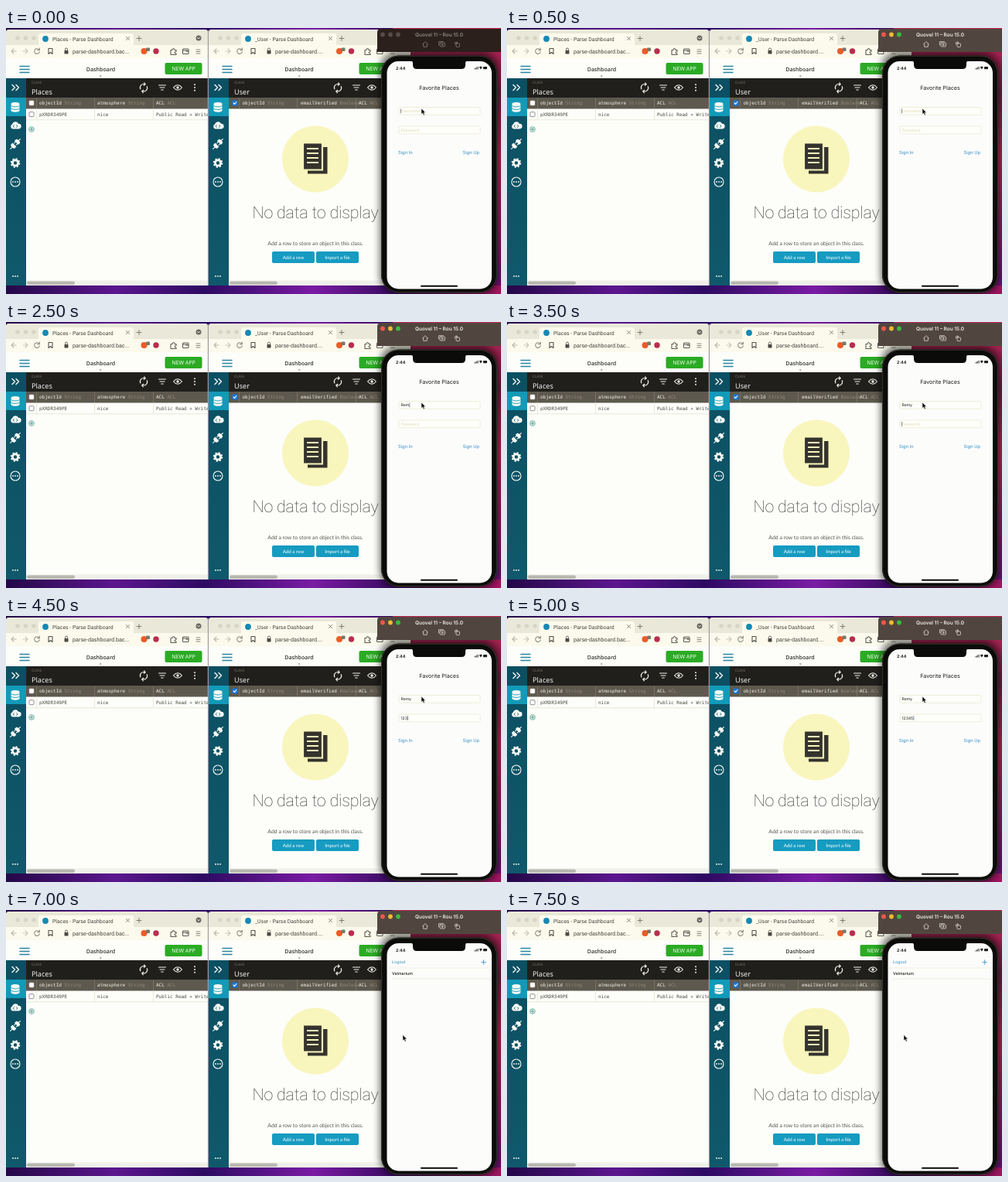
An HTML page that plays this animation: 640x344 px, repeating every 8000 ms.

```html
<!DOCTYPE html>
<html lang="en">
<head>
<meta charset="utf-8">
<title>Dashboard and phone sign-in</title>
<style>
html, body { margin: 0; width: 100%; height: 100%; overflow: hidden; background: #2c0a4c; }
svg { display: block; width: 100%; height: 100%; text-rendering: geometricPrecision; }
text { white-space: pre; }
.ui { font: 6.9px Roboto, sans-serif; fill: #45453f; }
.head { font: 600 7.1px "Open Sans", sans-serif; fill: #30302c; }
.title { font: 9.2px "Open Sans", sans-serif; fill: #fff; }
.mono { font: 6px "DejaVu Sans Mono", monospace; fill: #4a4a42; }
.th { fill: #f3f1e4; }
.dim { fill: #8e8a78; }
.lato { font: 6.9px Lato, sans-serif; fill: #55554e; }
.app { font: 5.1px Inter, sans-serif; fill: #1c1c18; }
.link { font-size: 5.8px; fill: #2e8cc4; }
.line { fill: none; stroke: currentColor; stroke-width: 1.1; stroke-linecap: round; stroke-linejoin: round; }
.mid { text-anchor: middle; }
</style>
</head>
<body>
<svg viewBox="0 0 640 344" preserveAspectRatio="none">
  <defs>
    <linearGradient id="wall">
      <stop offset="0" stop-color="#240848"/>
      <stop offset=".22" stop-color="#5c168e"/>
      <stop offset=".4" stop-color="#2d0a62"/>
      <stop offset=".62" stop-color="#7a1ba4"/>
      <stop offset=".78" stop-color="#3b0b62"/>
      <stop offset="1" stop-color="#a2175f"/>
    </linearGradient>
    <linearGradient id="edge" x2="0" y2="1">
      <stop offset="0" stop-color="#c8285c"/>
      <stop offset=".25" stop-color="#6b1c40"/>
      <stop offset=".5" stop-color="#b02a52"/>
      <stop offset="1" stop-color="#6a1270"/>
    </linearGradient>
    <linearGradient id="side" x2="0" y2="1">
      <stop offset="0" stop-color="#0c4f62"/>
      <stop offset="1" stop-color="#10586b"/>
    </linearGradient>
    <filter id="blur" x="-20%" y="-20%" width="140%" height="140%"><feGaussianBlur stdDeviation="5"/></filter>

    <!-- left-aligned parts of a browser window -->
    <g id="left">
      <g fill="#d6d5c8"><circle cx="15" cy="13" r="2.8"/><circle cx="25.5" cy="13" r="2.8"/><circle cx="36" cy="13" r="2.8"/></g>
      <path d="M42 22V10q0-3 3-3H162q3 0 3 3V22z" fill="#fbfaec"/>
      <circle cx="51" cy="14" r="3.9" fill="#1589b4"/>
      <path d="M155.5 11.5l4 4m0-4l-4 4M169 13.5h6m-3-3v6" class="line" color="#66665c" style="stroke-width:.8"/>
      <g class="line" color="#8a8a80">
        <path d="M13 30H7m3-3l-3 3 3 3" opacity=".6"/>
        <path d="M22 30h6m-3-3l3 3-3 3" opacity=".45"/>
        <path d="M43 28.5a3.3 3.3 0 1 0 .3 2.3M43.3 26v2.7h-2.7"/>
        <path d="M55 26.5h5v7l-2.5-2-2.5 2z" color="#55554e"/>
      </g>
      <rect x="75.5" y="29" width="5" height="4.5" rx=".7" fill="#4b4b44"/>
      <path d="M76.5 29v-1.5a1.5 1.5 0 0 1 3 0V29" class="line" color="#4b4b44" style="stroke-width:.8"/>
      <path d="M18 49.5h12M18 53.5h12M18 57.5h12" class="line" color="#2786a3" style="stroke-width:1.5"/>
      <rect y="65" width="26" height="268" fill="url(#side)"/>
      <rect y="90" width="26" height="24" fill="#129ab8"/>
      <g class="line" color="#f7faf5">
        <path d="M8 73.5l3.5 3.5L8 80.5m5-7l3.5 3.5-3.5 3.5" style="stroke-width:1.4"/>
        <circle cx="12" cy="199" r="6"/>
      </g>
      <g fill="#f7faf5">
        <path d="M6.5 98.5v8c0 3 11 3 11 0v-8z"/><ellipse cx="12" cy="98" rx="5.5" ry="2"/>
        <path d="M6.5 100.5c1 2 10 2 11 0M6.5 104c1 2 10 2 11 0" class="line" color="#129ab8" style="stroke-width:.9"/>
        <path d="M8.5 130.5a3.2 3.2 0 0 1-.5-6 4.3 4.3 0 0 1 8-.8 3.4 3.4 0 0 1 .5 6.8z"/>
        <path d="M10.5 125.5l-1.5 1.5 1.5 1.5m3-3l1.5 1.5-1.5 1.5" class="line" color="#10586b" style="stroke-width:.8"/>
        <g transform="rotate(45 12 150)">
          <path d="M8.5 148v-2.5q0-2 3.5-2t3.5 2v2.5zM8.5 151.5h7v2.5q0 2-3.5 2t-3.5-2z"/>
          <path d="M12 141v3m0 11v4M10.3 147v3m3.4-3v3" class="line" color="#f7faf5"/>
        </g>
        <circle cx="12" cy="174.5" r="3.6" fill="none" stroke="#f7faf5" stroke-width="2.8"/>
        <circle cx="12" cy="174.5" r="5.3" fill="none" stroke="#f7faf5" stroke-width="2" stroke-dasharray="2.08 2.08"/>
        <g id="dots"><circle cx="9" cy="199" r=".9"/><circle cx="12" cy="199" r=".9"/><circle cx="15" cy="199" r=".9"/></g>
        <use href="#dots" y="122"/>
      </g>
    </g>

    <!-- right-aligned parts of a browser window -->
    <g id="right">
      <g class="line" color="#5d5d55">
        <path d="M213 28.5h2q0-2 1.5-2t1.5 2h2v2q-2 0-2 1.2t2 1.3v1.5h-7z"/>
        <rect x="228.5" y="27" width="7.5" height="6.5" rx="1"/><path d="M233 30h3M228.5 29h6"/>
        <path d="M246 28h5m-5 2.5h5m-5 2.5h5" color="#8a8a80"/>
      </g>
      <circle cx="249" cy="13" r="3.5" fill="#6c6c64"/>
      <path d="M247.5 12.5l1.5 1.5 1.5-1.5" class="line" color="#fff" style="stroke-width:.8"/>
      <rect x="205.5" y="45" width="48" height="15" rx="2" fill="#2bab24"/>
      <text x="229.5" y="55" class="head mid" style="fill:#fff;font-weight:400">NEW APP</text>
      <g class="line" color="#f2f1e8">
        <path d="M173.8 79a4.5 4.5 0 0 1 6-6M182.2 75.5a4.5 4.5 0 0 1-6 6M178.7 70.8l1.6 2-2.1 1.5M177.3 83.8l-1.6-2 2.1-1.5"/>
        <path d="M197.5 74h9M199 77h6M200.7 80h2.6"/>
        <path d="M216.5 77q5.5-6.5 11 0-5.5 6.5-11 0z"/>
      </g>
      <g fill="#f2f1e8"><circle cx="222" cy="77" r="1.7"/><circle cx="244" cy="73.3" r="1"/><circle cx="244" cy="77" r="1"/><circle cx="244" cy="80.7" r="1"/></g>
    </g>
    <g id="badges">
      <circle cx="178.5" cy="30" r="4" fill="#ee5a25"/>
      <rect x="181" y="25.5" width="5" height="4.5" rx="1" fill="#77776c"/>
      <circle cx="194" cy="30" r="3.7" fill="#b92d4f"/>
    </g>
    <path id="caret" d="M120.8 61.5h2.8l-1.4 1.6z" fill="#66665c"/>
    <g id="frame">
      <path d="M0 333V6q0-4 4-4H257q4 0 4 4V333z" fill="#fdfdfa"/>
      <path d="M0 22V6q0-4 4-4H257q4 0 4 4V22z" fill="#eae9d9"/>
      <path d="M0 22H261V39H0z" fill="#fbfaec"/>
      <path d="M26 65H261V90H26z" fill="#211f1c"/>
      <path d="M26 90H261V104.5H26z" fill="#5e594e"/>
      <path d="M39.5 90.5v13.5M114.5 90.5v13.5M190.5 90.5v13.5" stroke="#817b6b" stroke-width=".7"/>
      <path d="M26 326.5H261V333H26z" fill="#f0f0ea"/>
      <rect x="27" y="327.5" width="62" height="4.5" rx="2.2" fill="#b9b9b2"/>
    </g>
  </defs>

  <rect width="640" height="344" fill="url(#wall)"/>
  <rect x="500" width="140" height="333" fill="url(#edge)"/>

  <g id="placesWindow">
    <use href="#frame"/><use href="#left"/><use href="#right"/><use href="#badges"/><use href="#caret"/>
    <text x="60" y="16.5" class="ui">Places - Parse Dashboard</text>
    <text x="86" y="32.6" class="ui" style="font-size:7.2px">parse-dashboard.bac...</text>
    <text x="122.5" y="55.5" class="head mid">Dashboard</text>
    <text x="33" y="72" class="lato" style="font-size:4.5px;fill:#77736a">CLASS</text>
    <text x="33" y="85.5" class="title">Places</text>
    <rect x="30" y="94" width="6" height="6" rx="1" fill="#fff" stroke="#c9c6b4" stroke-width=".6"/>
    <text x="43" y="99.3" class="mono th">objectId <tspan class="dim">String</tspan></text>
    <text x="118" y="99.3" class="mono th">atmosphere <tspan class="dim">String</tspan></text>
    <text x="194" y="99.3" class="mono th">ACL <tspan class="dim">ACL</tspan></text>
    <path d="M26 118.8H261M39.5 104.5v14M114.5 104.5v14M190.5 104.5v14" stroke="#e3e2cf" stroke-width=".8"/>
    <rect x="30" y="108.7" width="6" height="6" rx="1" fill="#fff" stroke="#77776f" stroke-width=".8"/>
    <text x="43" y="114.3" class="mono">pXRDR349PE</text>
    <text x="118" y="114.3" class="mono">nice</text>
    <text x="194" y="114.3" class="mono">Public Read + Write</text>
    <circle cx="33" cy="131" r="3.3" fill="#eaf5ec" stroke="#5ba79a" stroke-width=".9"/>
    <path d="M31.3 131h3.4m-1.7-1.7v3.4" class="line" color="#398f85" style="stroke-width:.8"/>
  </g>

  <path d="M261.3 3V333" stroke="#b9b8ad" stroke-width="1"/>
  <g id="userWindow">
    <use href="#frame" x="262"/><use href="#left" x="262"/><use href="#right" x="251"/>
    <use href="#badges" x="252.5"/><use href="#caret" x="257"/>
    <text x="322" y="16.5" class="ui">_User - Parse Dashboard</text>
    <text x="348" y="32.6" class="ui" style="font-size:7.2px">parse-dashboard....</text>
    <text x="379" y="55.5" class="head mid">Dashboard</text>
    <text x="295" y="72" class="lato" style="font-size:4.5px;fill:#77736a">CLASS</text>
    <text x="295" y="85.5" class="title">User</text>
    <rect x="292.5" y="93.5" width="7" height="7" rx="1.2" fill="#1877dc"/>
    <path d="M294.2 97l1.4 1.5 2.4-3" class="line" color="#fff"/>
    <text x="305.5" y="99.3" class="mono th">objectId <tspan class="dim">String</tspan></text>
    <text x="381" y="99.3" class="mono th">emailVerified <tspan class="dim">Boolean</tspan></text>
    <text x="456" y="99.3" class="mono th">ACL <tspan class="dim">ACL</tspan></text>
    <circle cx="400" cy="169.5" r="43" fill="#f8f6bc"/>
    <g fill="#34332d">
      <path d="M390 154h25.5v34.5H390z"/>
      <path d="M384 148.5h25v35h-25z" stroke="#f8f6bc" stroke-width="2.2"/>
    </g>
    <path d="M389 156h15M389 162h15M389 168h15M389 174h15" stroke="#f8f6bc" stroke-width="2"/>
    <text x="400" y="245.5" class="mid" style="font:100 21.5px Roboto,sans-serif;letter-spacing:-.2px" fill="#2b2b28">No data to display</text>
    <text x="400" y="281" class="lato mid">Add a row to store an object in this class.</text>
    <g fill="#169bc1"><rect x="344" y="289" width="55" height="15" rx="2"/><rect x="401" y="289" width="55" height="15" rx="2"/></g>
    <text x="371.5" y="298.7" class="lato mid" style="font-size:6.2px;fill:#fff">Add a row</text>
    <text x="428.5" y="298.7" class="lato mid" style="font-size:6.2px;fill:#fff">Import a file</text>
  </g>

  <g id="phone">
    <rect x="483" y="30" width="154" height="314" rx="24" fill="#000" opacity=".55" filter="url(#blur)"/>
    <path id="bar" d="M480 31V6q0-5 5-5H640V31z"/>
    <g id="lights"><circle cx="487" cy="8.5" r="2.9"/><circle cx="497" cy="8.5" r="2.9"/><circle cx="507" cy="8.5" r="2.9"/></g>
    <g id="barItems">
      <text x="560" y="11" class="mid" style="font:600 6.5px Inter,sans-serif" fill="#efece6">Quovel 11 – Rou 15.0</text>
      <g class="line" color="#ddd8d0" style="stroke-width:.8">
        <path d="M538.5 21l3.5-3.3 3.5 3.3M539.7 20.5v3.8h4.6v-3.8"/>
        <rect x="561" y="19" width="6.5" height="5" rx="1"/><path d="M559.5 22v-4.3h6"/><circle cx="564.2" cy="21.5" r="1"/>
        <rect x="582" y="20" width="4.5" height="4.5" rx=".8"/><path d="M580.5 21v-2.2h3m-1.2-1.2l1.2 1.2-1.2 1.2"/>
      </g>
    </g>
    <rect x="485" y="35.5" width="150" height="307" rx="23" fill="#0b0b09"/>
    <rect x="485.7" y="36.2" width="148.6" height="305.6" rx="22.3" fill="none" stroke="#3a392f" stroke-width="1"/>
    <rect x="492.5" y="43" width="135.5" height="294.5" rx="15" fill="#fcfcfb"/>
    <path d="M523 42.5q3 0 3 3v2q0 5.5 5 5.5h58q5 0 5-5.5v-2q0-3 3-3z" fill="#0b0b09"/>
    <text x="504" y="54" class="app" style="font-weight:700;font-size:5.3px">2:44</text>
    <path d="M606 53.5v-1.5m1.4 1.5v-2.2m1.4 2.2v-3m1.4 3v-3.7" stroke="#1c1c18" stroke-width=".8"/>
    <path d="M611.8 50.5q2-1.7 4 0l-2 3z" fill="#1c1c18"/>
    <rect x="617" y="50" width="5" height="3.3" rx=".8" fill="#1c1c18"/>

    <g id="login">
      <text x="560" y="79.8" class="app mid" style="font-size:7.2px">Favorite Places</text>
      <g fill="#fefefa" stroke="#ebe9d0" stroke-width=".8">
        <rect x="508" y="102.5" width="105" height="9.8" rx="1.5"/>
        <rect x="508" y="127" width="105" height="9.8" rx="1.5"/>
      </g>
      <text id="user" x="510.5" y="109.2" class="app"></text>
      <text id="pass" x="510.5" y="133.8" class="app"></text>
      <rect id="beam" width=".8" height="6" fill="#6a7480"/>
      <text x="507" y="163.2" class="app link">Sign In</text>
      <text x="590.5" y="163.2" class="app link">Sign Up</text>
    </g>
    <g id="list">
      <text x="499" y="69.2" class="app link" style="font-size:5.3px">Logout</text>
      <path d="M614.8 67.5h5.6m-2.8-2.8v5.6" class="line" color="#2e8cc4" style="stroke-width:.8"/>
      <path d="M492.5 75H628M499 89H628" stroke="#ebe9d0" stroke-width=".7"/>
      <text x="499" y="83.8" class="app" style="font-size:5.3px;font-weight:500">Velmarium</text>
    </g>
    <rect x="536" y="332.8" width="48" height="2" rx="1" fill="#0b0b09"/>
    <path id="pointer" d="M0 0V7.4L1.7 5.9 2.9 8.7 4.3 8.1 3.1 5.4H5.4z" fill="#0b0b09" stroke="#fff" stroke-width=".5"/>
  </g>
</svg>
<script>
const LOOP = 8000;
const $ = id => document.getElementById(id);
const NAME = "Remy", CODE = "123456";

// Last value whose start time has passed, from [time, value] pairs.
const at = (steps, t) => steps.reduce((value, [start, v]) => t >= start ? v : value, steps[0][1]);

const nameLength = [[0, 0], [1500, 1], [2000, 2], [2500, 3], [3000, 4]];
const codeLength = [[0, 0], [4000, 1], [4500, 3], [5000, 5], [5500, 6]];
const focusField = [[0, "user"], [3500, "pass"], [6000, null]];
const pointerPath = [[0, [537, 104]], [6000, [521.5, 183.5]], [6500, [513, 161.5]]];
const LIST_TIME = 7000, ACTIVE_TIME = 500;

function fillField(id, value, hint) {
  const field = $(id);
  const text = value || hint;
  if (field.textContent !== text) field.textContent = text;
  field.style.fill = value ? "" : "#dedbb0";
}

function placeBeam(field, value) {
  const beam = $("beam");
  beam.style.display = field ? "" : "none";
  if (!field) return;
  const width = value ? $(field).getComputedTextLength() : -0.8;
  beam.setAttribute("x", 510.8 + width);
  beam.setAttribute("y", field === "user" ? 104.4 : 129);
}

function draw(t) {
  const active = t >= ACTIVE_TIME;
  $("bar").setAttribute("fill", active ? "#51463f" : "#2b201b");
  $("barItems").style.opacity = active ? 1 : .5;
  const colors = active ? ["#f2574b", "#f0b92f", "#38bd40"] : ["#574c45", "#574c45", "#574c45"];
  [...$("lights").children].forEach((light, i) => light.setAttribute("fill", colors[i]));

  const listed = t >= LIST_TIME;
  $("login").style.display = listed ? "none" : "";
  $("list").style.display = listed ? "" : "none";
  if (!listed) {
    const values = {
      user: NAME.slice(0, at(nameLength, t)),
      pass: CODE.slice(0, at(codeLength, t))
    };
    fillField("user", values.user, "Username");
    fillField("pass", values.pass, "Password");
    const field = at(focusField, t);
    placeBeam(field, values[field]);
  }
  $("pointer").setAttribute("transform", `translate(${at(pointerPath, t)})`);
}

const start = performance.now();
function tick() {
  draw((performance.now() - start) % LOOP);
  requestAnimationFrame(tick);
}
tick();
</script>
</body>
</html>
```
